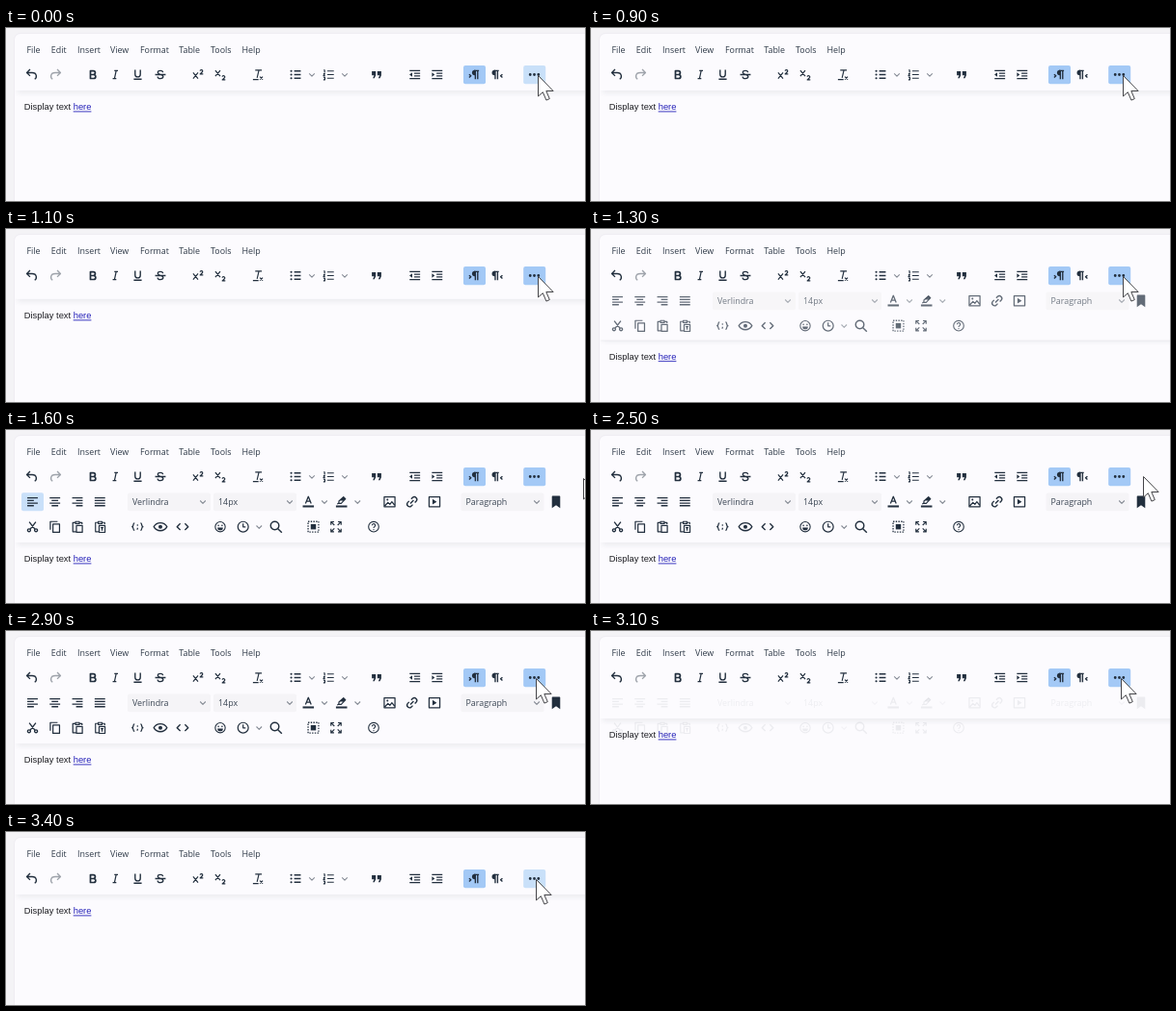
An HTML page with a canvas that plays this animation: 600 by 180 pixels, repeating every 3.6 s.

```html
<!DOCTYPE html>
<html lang="en">
<head>
<meta charset="utf-8">
<title>Toolbar overflow</title>
<style>
html, body { margin: 0; width: 600px; height: 180px; overflow: hidden; background: #f4f3f6; }
canvas { display: block; width: 600px; height: 180px; }
</style>
</head>
<body>
<canvas id="stage"></canvas>
<script>
const W = 600, H = 180, LOOP = 3600, STEP = 100;
const INK = '#222f3e', PAPER = '#fcfbfe', ACTIVE = '#a3c9f6', HOVER = '#c9e0f9';
const UI = '8.9px "Open Sans", "Noto Sans", sans-serif';
const BODY = '9.35px "Liberation Sans", Arial, sans-serif';
const ROWS = [48.5, 74.7, 100.7];

const canvas = document.getElementById('stage');
const ctx = canvas.getContext('2d');
const ratio = window.devicePixelRatio || 1;
canvas.width = W * ratio;
canvas.height = H * ratio;

const ring = (x, y, r) => `M${x - r} ${y}a${r} ${r} 0 1 0 ${2 * r} 0a${r} ${r} 0 1 0 ${-2 * r} 0z`;
const lines = (...xs) => xs.map(([x, w], i) => `M${x} ${6 + 4 * i}h${w}`).join('');
const list = 'M10 6.5h10M10 12h10M10 17.5h10';
const dents = 'M4 6h16M11 10h9M11 14h9M4 18h16';
const pilcrow = x => `M${x + 1} 19V6M${x + 4.6} 19V6M${x - 1} 6h7.5`;
const bowl = x => `M${x + 1} 5h-1a4 4 0 0 0 0 8h1z`;
const cross = y => `M4.5 ${y}l7.5 9M12 ${y}l-7.5 9`;
const two = y => `M15.2 ${y}a1.9 1.9 0 1 1 3.5 1.3l-3.5 3.4h4.6`;
const board = 'M9.5 19.5H5V5.5h3M16 5.5h3V8M9 4h6v3H9zM10.5 10h9v10.5h-9z';

// Icons on a 24 unit grid: stroke, fill, line width, dash
const icons = {
  undo: ['M9 4L4 9l5 5M4.5 9H12c8 0 7.5 8 4 10'],
  redo: ['M15 4l5 5-5 5M19.5 9H12c-8 0-7.5 8-4 10'],
  bold: ['M8.3 6.2h4.4a2.9 2.9 0 0 1 0 5.8H8.3zM8.3 12h5a2.9 2.9 0 0 1 0 5.9h-5z', '', 2.5],
  italic: ['M10.5 5.9h5.5M8 18.1h5.5M13.3 6l-2.6 12', '', 1.8],
  underline: ['M8 4.5v7a4 4 0 0 0 8 0v-7M6 19h12'],
  strike: ['M16 8.5c-.4-2-2-2.7-4-2.7-2.3 0-4 1-4 2.9 0 1.6 1.5 2.4 4 3.1 2.7.7 4.2 1.5 4.2 3.3 0 2-1.8 3.1-4.2 3.1s-4-.9-4.4-3M4 12h16', '', 1.9],
  sup: [cross(9) + two(6.3), '', 1.8],
  sub: [cross(5.5) + two(15.3), '', 1.8],
  clear: ['M8 5.2h10M13.5 5.5L10.8 17M4.5 19.5h8.5M15 15l4.5 4.5m0-4.5L15 19.5', '', 1.7],
  bullets: [list, ring(5.5, 6.5, 1.6) + ring(5.5, 12, 1.6) + ring(5.5, 17.5, 1.6)],
  numbers: [list + 'M4.5 5h1.4v4M4 10.5h2.2l-2 3.2h2.5M4 16h2.3v3.8H4', '', 1.7],
  quote: ['', 'M4.8 7h6v6l-2 4.5H6.3l2-4.5H4.8zM13.2 7h6v6l-2 4.5h-2.5l2-4.5h-3.5z'],
  outdent: [dents, 'M8 8.6v6.8L3.7 12z', 1.8],
  indent: [dents, 'M4 8.6v6.8L8.3 12z', 1.8],
  ltr: [pilcrow(13) + 'M4.5 11.5L7.3 14l-2.8 2.5', bowl(13)],
  rtl: [pilcrow(8) + 'M20 11.5L17.2 14l2.8 2.5', bowl(8)],
  more: ['', ring(5.7, 12, 2.1) + ring(12, 12, 2.1) + ring(18.3, 12, 2.1)],
  left: [lines([4, 16], [4, 10], [4, 16], [4, 10])],
  center: [lines([4, 16], [7, 10], [4, 16], [7, 10])],
  right: [lines([4, 16], [10, 10], [4, 16], [10, 10])],
  justify: [lines([4, 16], [4, 16], [4, 16], [4, 16])],
  color: ['M7.7 14.5L12 4l4.3 10.5M9.2 11.3h5.6', 'M3.5 17.5h17v3h-17z', 1.9],
  marker: ['M8 11l7-6.5 3 3-6.5 7H8zM8 13.5L5.5 15.5', 'M3.5 17.5h17v3h-17zM9 10l6-5.5 3 3-3 3z', 1.7],
  image: ['M3.8 4.5h16.4v15H3.8zM5 18l4.5-5 3 3 3-4 4 5', ring(8.7, 8.8, 1.5), 1.8],
  link: ['M9.5 14.5l5-5M10.8 7.7l2.2-2.2a3.9 3.9 0 0 1 5.5 5.5l-2.2 2.2M13.2 16.3L11 18.5A3.9 3.9 0 0 1 5.5 13l2.2-2.2'],
  media: ['M3.8 4.5h16.4v15H3.8z', 'M9 7.8v8.4l6.5-4.2z', 1.8],
  bookmark: ['', 'M5.7 4a1 1 0 0 1 1-1h10.6a1 1 0 0 1 1 1v17.5L12 17.2l-6.3 4.3z'],
  cut: ['M7 4.5l8.5 11M17 4.5l-8.5 11' + ring(6.7, 17.3, 2.2) + ring(17.3, 17.3, 2.2)],
  copy: ['M16 4H5v12.5M9 8h10v12.5H9z', '', 1.8],
  paste: [board, '', 1.8],
  pasteText: [board + 'M12.8 13.3h4.4M15 13.3v4.5', '', 1.7],
  braces: ['M7.5 6.5c-3.3 0-.5 4.5-3.7 5.5 3.2 1 .4 5.5 3.7 5.5M16.5 6.5c3.3 0 .5 4.5 3.7 5.5-3.2 1-.4 5.5-3.7 5.5M12 13.5v1.5l-.8 1.2', ring(12, 9.5, 1.2), 1.8],
  eye: ['M2 12c4.4-8 15.6-8 20 0-4.4 8-15.6 8-20 0z', ring(12, 12, 3)],
  code: ['M8.5 7l-5 5 5 5M15.5 7l5 5-5 5'],
  smile: [ring(12, 12, 7.6), ring(9.2, 10, 1.2) + ring(14.8, 10, 1.2) + 'M7.8 13a4.2 4.2 0 0 0 8.4 0z', 1.6],
  clock: [ring(12, 12, 8) + 'M12 7v5.2h3.8', '', 1.8],
  search: [ring(10.3, 10.3, 6.3) + 'M15 15l6 6', '', 2.1],
  all: ['M4 4h16v16H4z', 'M8 8h8v8H8z', 1.9, [2, 2]],
  full: ['M15 4.3h4.7V9M19.5 4.5l-5 5M9 4.3H4.3V9M4.5 4.5l5 5M15 19.7h4.7V15M19.5 19.5l-5-5M9 19.7H4.3V15M4.5 19.5l5-5', '', 1.7],
  help: [ring(12, 12, 7.8) + 'M9.6 9.9a2.4 2.4 0 1 1 3.7 2c-.9.6-1.3 1-1.3 2', ring(12, 16.2, 1), 1.6]
};
for (const k in icons) {
  const [s, f, w = 2, dash = []] = icons[k];
  icons[k] = { s: new Path2D(s), f: new Path2D(f || ''), w, dash };
}

const layout = [
  { undo: 27, bold: 90, italic: 113.3, underline: 136.5, strike: 160, sup: 199, sub: 222, clear: 261,
    bullets: 300, numbers: 334.3, quote: 384, outdent: 423.7, indent: 446.8, ltr: 485, rtl: 509, more: 547.5 },
  { left: 27.5, center: 50.7, right: 74, justify: 97.3, color: 313.3, marker: 347.7, image: 397.5,
    link: 420.7, media: 444, bookmark: 570 },
  { cut: 27.5, copy: 50.7, paste: 74, pasteText: 97.5, braces: 136.3, eye: 160, code: 183, smile: 222,
    clock: 245.7, search: 279.7, all: 318.5, full: 342, help: 381 }
];
const chevrons = [[317, 351], [204, 294, 330, 364.3, 550], [262.3]];
const menu = { File: 21.5, Edit: 46.8, Insert: 74, View: 108, Format: 139, Table: 179.3, Tools: 212, Help: 244.4 };

// time, x, y of the pointer tip
const path = [
  [0, 551, 49], [1400, 551, 49], [1500, 574, 50], [1600, 598, 50], [1700, 602, 49], [2000, 602, 48],
  [2100, 599, 48], [2400, 599, 48], [2500, 572, 48], [2600, 560, 48], [2700, 552, 49], [2800, 549, 49], [LOOP, 549, 49]
];
const arrow = new Path2D('M0 0V21.5L4.8 17.2 8.4 25.6 11.8 24.1 8.3 16H15.6Z');

const clamp = v => Math.max(0, Math.min(1, v));

// cubic-bezier(.25, .1, .25, 1)
function ease(p) {
  let lo = 0, hi = 1, u = 0.5;
  const at = (a, b) => 3 * (1 - u) * (1 - u) * u * a + 3 * (1 - u) * u * u * b + u * u * u;
  for (let i = 0; i < 24; i++) {
    u = (lo + hi) / 2;
    if (at(0.25, 0.25) < p) lo = u; else hi = u;
  }
  return at(0.1, 1);
}

function overflow(t) {
  if (t < 2900) {
    const dt = t - 1060;
    return { grow: dt <= 0 ? 0 : ease(clamp(dt / 300)), alpha: clamp((dt - 100) / 200) };
  }
  const dt = t - 2900;
  return { grow: 1 - clamp((dt - 100) / 200), alpha: dt >= 300 ? 0 : 1 - ease(clamp(dt / 300)) };
}

function pointer(t) {
  const i = path.findIndex(k => k[0] > t);
  const a = path[i - 1], b = path[i], p = (t - a[0]) / (b[0] - a[0]);
  return [a[1] + (b[1] - a[1]) * p, a[2] + (b[2] - a[2]) * p];
}

function icon(name, x, y, color = INK) {
  const g = icons[name];
  ctx.save();
  ctx.translate(x, y);
  ctx.scale(0.68, 0.68);
  ctx.translate(-12, -12);
  ctx.strokeStyle = ctx.fillStyle = color;
  ctx.lineWidth = g.w;
  ctx.setLineDash(g.dash);
  ctx.stroke(g.s);
  ctx.fill(g.f);
  ctx.restore();
}

function chevron(x, y) {
  ctx.strokeStyle = '#858b95';
  ctx.lineWidth = 1.1;
  ctx.beginPath();
  ctx.moveTo(x - 2.8, y - 1.2);
  ctx.lineTo(x, y + 1.6);
  ctx.lineTo(x + 2.8, y - 1.2);
  ctx.stroke();
}

function box(x, y, w, h, color, r = 2) {
  ctx.fillStyle = color;
  ctx.beginPath();
  ctx.roundRect(x, y, w, h, r);
  ctx.fill();
}

function label(s, x, y, color = INK, font = UI) {
  ctx.font = font;
  ctx.fillStyle = color;
  ctx.fillText(s, x, y);
}

function row(i) {
  const y = ROWS[i];
  for (const name in layout[i]) icon(name, layout[i][name], y);
  chevrons[i].forEach(x => chevron(x, y));
}

function field(s, x) {
  box(x, ROWS[1] - 9.3, 86, 18.8, '#f5f4f7');
  label(s, x + 5, ROWS[1] + 3.4, '#3b4654');
}

function shadow(bottom, dy, blur, inset, alpha) {
  ctx.save();
  ctx.shadowColor = `rgba(34,47,62,${alpha})`;
  ctx.shadowBlur = blur * ratio;
  ctx.shadowOffsetY = dy * ratio;
  ctx.fillStyle = PAPER;
  ctx.fillRect(9 + inset, 20, 620, bottom - 20 - inset);
  ctx.restore();
}

function header(bottom) {
  ctx.save();
  ctx.beginPath();
  ctx.rect(9, 0, W, H);
  ctx.clip();
  shadow(bottom, 5.4, 5.4, 2.7, 0.07);
  shadow(bottom, 1.4, 1.4, 1.3, 0.1);
  ctx.fillStyle = PAPER;
  ctx.fillRect(9, 20, W, bottom - 20);
  ctx.restore();
}

function content(y) {
  const lead = 'Display text ', x = 18.8;
  label(lead, x, y, '#1d1d22', BODY);
  const lx = x + ctx.measureText(lead).width;
  label('here', lx, y, '#2420b8', BODY);
  ctx.fillRect(lx, y + 1.1, ctx.measureText('here').width, 0.9);
}

function draw(t) {
  const { grow, alpha } = overflow(t);
  const shift = 52 * grow;
  ctx.setTransform(ratio, 0, 0, ratio, 0, 0);
  ctx.lineJoin = 'round';
  ctx.fillStyle = '#f4f3f6';
  ctx.fillRect(0, 0, W, H);
  box(8, 5, 620, 200, '#efedf2', 7);
  box(9, 6, 620, 200, PAPER, 6);
  header(65 + shift);
  content(85.4 + shift);

  for (const s in menu) label(s, menu[s], 25.8, '#2f3a48');
  box(474, 39, 23, 19.3, ACTIVE);
  box(536.2, 39, 23, 19.3, t >= 900 && t < 3300 ? ACTIVE : HOVER);
  row(0);
  icon('redo', 51, ROWS[0], '#9ea3ab');

  if (alpha > 0) {
    ctx.globalAlpha = alpha;
    if (t >= 1400 && t < 1800) box(16, 65.2, 23, 19, HOVER);
    field('Verlindra', 126);
    field('14px', 215);
    field('Paragraph', 471.5);
    row(1);
    row(2);
    ctx.globalAlpha = 1;
  }

  const [x, y] = pointer(t);
  ctx.save();
  ctx.translate(x + 0.5, y + 0.5);
  ctx.fillStyle = '#fff';
  ctx.fill(arrow);
  ctx.strokeStyle = '#454549';
  ctx.lineWidth = 1;
  ctx.lineJoin = 'miter';
  ctx.stroke(arrow);
  ctx.restore();
}

const start = performance.now();
function tick() {
  const t = (performance.now() - start) % LOOP;
  draw(Math.floor(t / STEP) * STEP);
  requestAnimationFrame(tick);
}
tick();
</script>
</body>
</html>
```
